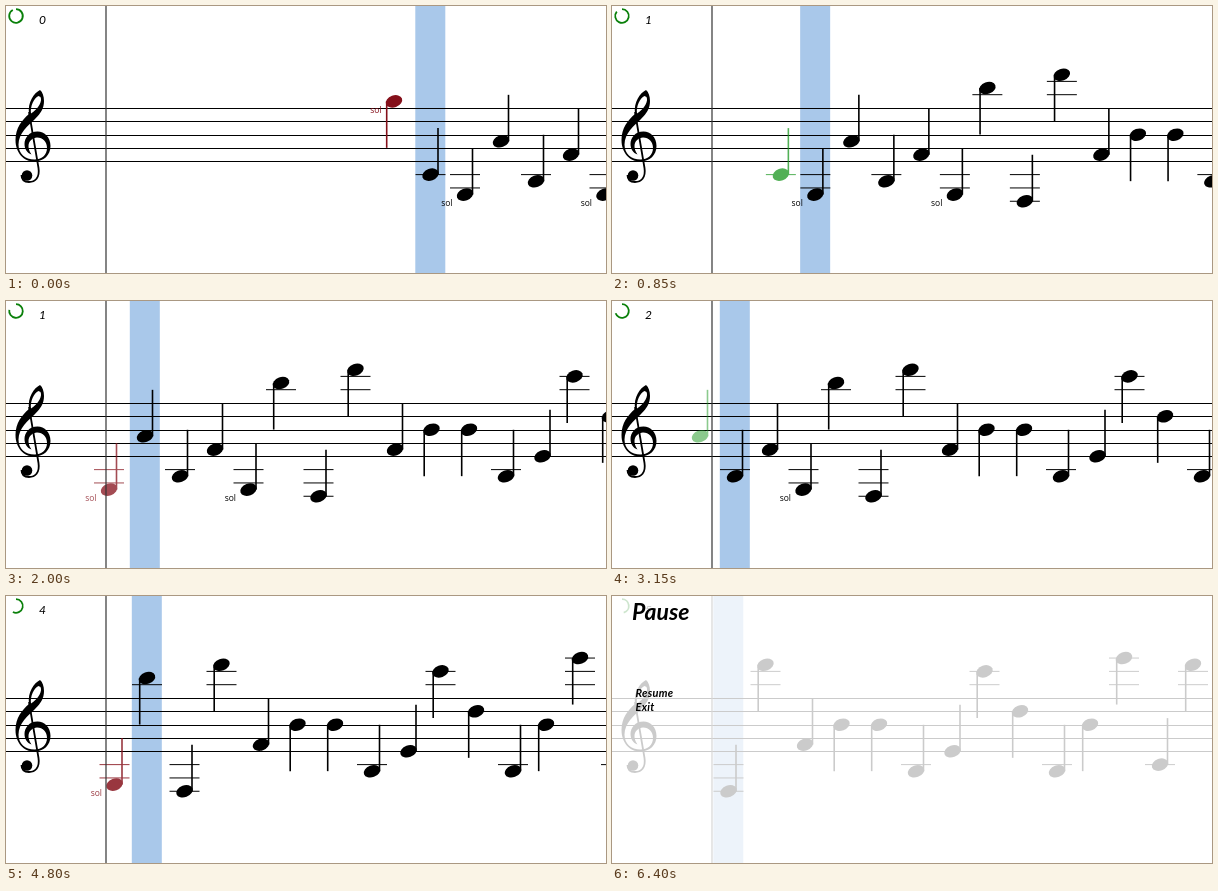
These frames come from a looping animation (600x267 px, 6850 ms). An HTML page:

```html
<!DOCTYPE html>
<html lang="en">
<head>
<meta charset="utf-8">
<title>Note reading game</title>
<style>
  html, body { margin: 0; width: 100%; height: 100%; overflow: hidden; background: #fff; }
  svg { display: block; width: 100vw; height: 100vh; }
  text { font-family: Lato, "Open Sans", sans-serif; font-style: italic; font-weight: bold; }
  .label { font: 8.5px "Open Sans", sans-serif; text-anchor: end; }
  .score { font-size: 12px; font-weight: normal; }
  .title { font-size: 23px; }
  .item { font-size: 11px; letter-spacing: .3px; }
</style>
</head>
<body>
<svg id="stage" viewBox="0 0 600 267">
  <g id="scene">
    <rect id="band" width="30" height="267" fill="#a9c8ea"/>
    <g id="staff"></g>
    <g id="clef">
      <path fill-rule="evenodd" d="M34 84C28 87 21.5 96 23 108C16 114 9.5 122 9.5 134
        C9.5 147 18 155.5 28 155.5C38 155.5 44.5 149 44.5 140C44.5 131 38.5 125.5 31.5 125.5
        C23 125.5 18.5 132 18.5 138C18.5 143 21 147 25.5 148.5C23 145 22.5 142 22.5 140
        C22.5 135 27 131.5 31 131.5C37 131.5 41 136 41 142C41 149 35.5 153.5 28.5 153.5
        C19 153.5 12.5 147.5 12.5 138.5C12.5 127 22 120 29 113C35 107 38 102 38 95
        C38 90 36.5 86 34 84Z M34.5 91C36.5 95 33 102 25 107.5C24 100 28 92 32.5 90Z"/>
      <path d="M23 106L32.5 162C34 172 29 176 23 176C18 176 15.5 173 15.5 169" fill="none" stroke="#000" stroke-width="1.8"/>
      <circle cx="21" cy="169.5" r="5.3"/>
    </g>
    <g id="notes"></g>
    <path d="M100 0V267" stroke="#333" stroke-width="1.2"/>
    <path id="timer" fill="none" stroke="#0a800a" stroke-width="1.8"/>
    <text id="score" class="score" x="33" y="17.5"></text>
  </g>
  <g id="menu">
    <text class="title" x="20" y="24">Pause</text>
    <text class="item" x="23.5" y="101">Resume</text>
    <text class="item" x="23.5" y="115">Exit</text>
  </g>
</svg>
<script>
const LOOP = 6850, TICK = 50, FADE = 600;
const RED = [133, 16, 26], GREEN = [25, 150, 30], GREY = [85, 85, 85];

// Start x and staff step (0 = bottom line), then hit time and whether it was right.
const NOTES = [
  [388, 9, 0, false], [424.5, -2, 700, true], [459, -5, 1850, false], [495, 3, 2850, true],
  [530, -3, 3500, true], [565, 1, 4150, true], [598.5, -5, 4700, false], [631, 11, 5550, true],
  [668.5, -6], [705.5, 13], [745, 1], [781.5, 4], [819, 4], [856, -3], [892.5, 0], [924.5, 12],
  [960, 6], [997, -3], [1030, 4], [1064, 14], [1100, -2], [1133, 13]
].map(([x, step, hit = Infinity, right]) => ({ x, step, hit, right }));

// Scroll: time in ms, distance in px, speed in px/s.
const SCROLL = [
  [0, 0, 350], [450, 147, 300], [1300, 322, 48], [2000, 356, 46],
  [3150, 407, 47], [4800, 490, 49], [6100, 552, 45]
];

const $ = id => document.getElementById(id);
const clamp = v => Math.max(0, Math.min(1, v));
const ramp = (t, from, to) => clamp((t - from) / (to - from));
const lineY = step => 155.3 - step * 6.66;

function add(parent, tag, attrs, text) {
  const el = document.createElementNS("http://www.w3.org/2000/svg", tag);
  for (const k in attrs) el.setAttribute(k, attrs[k]);
  if (text) el.textContent = text;
  return parent.appendChild(el);
}

function buildNote(note) {
  const y = lineY(note.step), up = note.step < 4;
  const g = add($("notes"), "g", { fill: "currentColor", stroke: "none" });
  const line = (d, width) => add(g, "path", { d, stroke: "currentColor", "stroke-width": width });
  for (let s = -2; s >= note.step; s -= 2) line(`M-15 ${lineY(s)}h30`, 1);
  for (let s = 10; s <= note.step; s += 2) line(`M-15 ${lineY(s)}h30`, 1);
  line(`M${up ? 7.5 : -7.3} ${y}v${up ? -46.5 : 46.5}`, 1.6);
  add(g, "ellipse", { rx: 8.5, ry: 5.9, transform: `translate(0 ${y}) rotate(-20)` });
  if (note.right === false) add(g, "text", { class: "label", x: -12.5, y: y + 11.5 }, "sol");
  note.el = g;
}

function scrollAt(t) {
  const i = SCROLL.findIndex(k => k[0] > t);
  if (i < 0) return SCROLL[SCROLL.length - 1][1];
  const [t0, p0, v0] = SCROLL[i - 1], [t1, p1, v1] = SCROLL[i];
  const d = (t1 - t0) / 1000, u = (t - t0) / (t1 - t0), w = 1 - u;
  return w * w * (1 + 2 * u) * p0 + u * u * (3 - 2 * u) * p1 + d * u * w * (w * v0 - u * v1);
}

function drawNote(note, t, shift) {
  const age = t - note.hit, style = note.el.style;
  style.display = age >= FADE ? "none" : "";
  style.opacity = age < 0 ? 1 : 1 - age / FADE;
  const base = note.right ? GREEN : RED, mix = ramp(age, 330, 450);
  style.color = age < 0 ? "#000"
    : `rgb(${base.map((c, i) => Math.round(c + (GREY[i] - c) * mix))})`;
  note.el.setAttribute("transform", `translate(${note.x - shift} 0)`);
}

function drawTimer(t) {
  const a = (332 - t * 0.026) * Math.PI / 180;
  const x = 10 + 6.8 * Math.sin(a), y = 10 - 6.8 * Math.cos(a);
  $("timer").setAttribute("d", `M10 3.2A6.8 6.8 0 ${a > Math.PI ? 1 : 0} 1 ${x} ${y}`);
}

function render(t) {
  const shift = scrollAt(t);
  NOTES.forEach(n => drawNote(n, t, shift));
  const current = NOTES.find(n => n.hit > t);
  $("band").setAttribute("x", current.x - shift - 15.2);
  $("score").textContent = NOTES.filter(n => n.right && n.hit <= t).length;
  drawTimer(t);
  $("scene").style.opacity = 1 - 0.8 * ramp(t, 6050, 6300);
  $("menu").style.opacity = ramp(t, 6100, 6400);
}

for (let s = 0; s <= 8; s += 2) {
  add($("staff"), "path", { d: `M0 ${Math.round(lineY(s)) + 0.5}H600`, stroke: "#000", "stroke-width": 1 });
}
NOTES.forEach(buildNote);

const start = performance.now();
function frame() {
  const t = (performance.now() - start) % LOOP;
  render(Math.floor(t / TICK) * TICK);
  requestAnimationFrame(frame);
}
frame();
</script>
</body>
</html>
```
